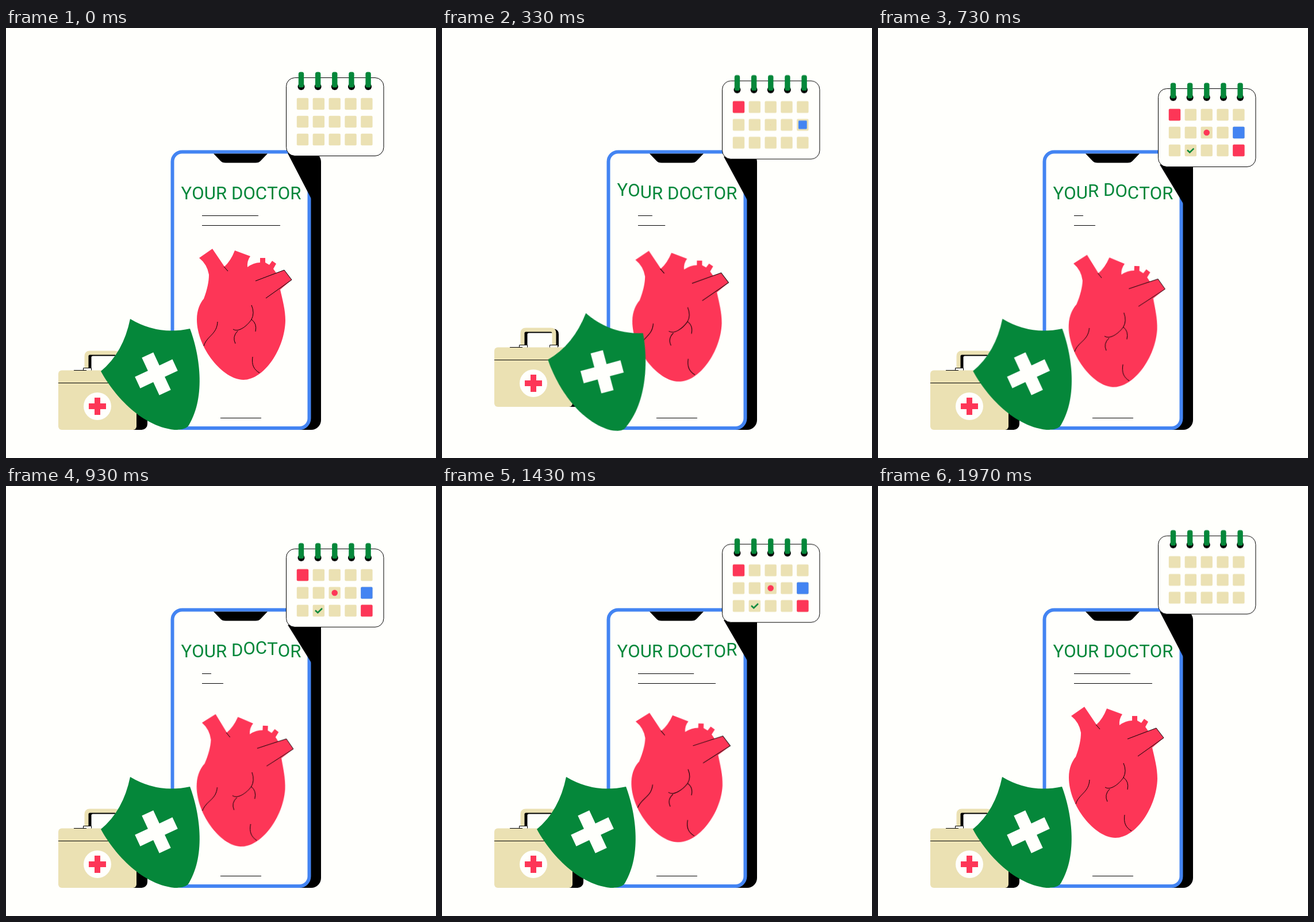
An HTML page for the animation above (2010 ms loop, 748x748 px).

```html
<!DOCTYPE html>
<html lang="en">
<head>
<meta charset="utf-8">
<title>Your doctor</title>
<style>
  :root {
    --paper: #fffffc; --green: #05873a; --red: #fd3657;
    --blue: #4384f2; --tan: #ebe1b3;
    --loop: 2010ms; --soft: cubic-bezier(.37, 0, .63, 1);
  }
  html, body { margin: 0; width: 100%; height: 100%; overflow: hidden; background: var(--paper); }
  svg { position: absolute; left: 0; top: 0; width: 748px; height: 748px; }

  .paper { fill: var(--paper); }
  .green { fill: var(--green); }
  .red { fill: var(--red); }
  .blue { fill: var(--blue); }
  .tan { fill: var(--tan); }
  .thin { fill: none; stroke: #000; stroke-width: 1; }
  .frame { stroke: var(--blue); stroke-width: 6; }
  .handle { fill: none; stroke: #000; stroke-width: 7; }
  .handle.light { stroke: var(--tan); }

  .title {
    position: absolute; left: 304.5px; top: 267.5px; white-space: pre;
    font: 400 31.2px/40px Roboto, Arial, sans-serif; color: var(--green);
  }
  .title span { display: inline-block; animation-delay: calc(var(--i) * 108ms); }

  .title span, .calendar, .cast, .heart, .beat, .case, .shield, .short, .long, .pop, .tick {
    animation-duration: var(--loop);
    animation-timing-function: var(--soft);
    animation-iteration-count: infinite;
  }
  .title span { animation-name: hop; }
  .calendar { animation-name: sink; }
  .cast { animation-name: cast; transform-origin: 490px 222px; }
  .heart { animation-name: sway; transform-origin: 410px 500px; }
  .beat { animation-name: beat; transform-origin: 410px 500px; }
  .case { animation-name: lift; }
  .shield { animation-name: tilt; transform-origin: 290px 697px; }
  .short { animation-name: short; transform-origin: 341px 0; }
  .long { animation-name: long; transform-origin: 341px 0; }
  .pop { transform-box: fill-box; transform-origin: center; }
  .tick {
    animation-name: tick; fill: none; stroke: var(--green); stroke-width: 2.5;
    stroke-dasharray: 1 2;
  }

  @keyframes hop { 0%, 29.85%, 100% { transform: none; } 14.93% { transform: translateY(-6px); } }
  @keyframes sink {
    0%, 100% { transform: translateY(0); }
    51% { transform: translateY(23.3px); animation-timing-function: cubic-bezier(.33, .05, .67, .93); }
  }
  @keyframes cast {
    0%, 100% { transform: translateY(0) scaleY(1); }
    51% {
      transform: translateY(23.3px) scaleY(.83);
      animation-timing-function: cubic-bezier(.33, .05, .67, .93);
    }
  }
  @keyframes sway {
    0%, 100% { transform: translateY(0) rotate(0deg); }
    51% { transform: translateY(15.5px) rotate(2.8deg); }
  }
  @keyframes beat {
    0%, 7.5%, 25.4%, 58.7%, 83.6%, 100% { transform: scale(1, 1); }
    16.4% { transform: scale(1.01, .995); }
    71.1% { transform: scale(1.03, .98); }
  }
  @keyframes lift { 0%, 35.3%, 100% { transform: translateY(0); } 17.7% { transform: translateY(-40.5px); } }
  @keyframes tilt { 0%, 37.8%, 100% { transform: rotate(0deg); } 18.9% { transform: rotate(10.4deg); } }
  @keyframes short { 0%, 72.6%, 100% { transform: scaleX(1); } 20.9%, 51.2% { transform: scaleX(.163); } }
  @keyframes long { 0%, 72.6%, 100% { transform: scaleX(1); } 20.9%, 51.2% { transform: scaleX(.272); } }
  @keyframes pop1 { 0%, 2%, 97.5%, 100% { transform: scale(0); } 14.4%, 89.6% { transform: scale(1); } }
  @keyframes pop2 { 0%, 8.5%, 97.5%, 100% { transform: scale(0); } 20.9%, 89.6% { transform: scale(1); } }
  @keyframes pop3 { 0%, 14.9%, 97.5%, 100% { transform: scale(0); } 27.4%, 89.6% { transform: scale(1); } }
  @keyframes pop4 { 0%, 20.6%, 97.5%, 100% { transform: scale(0); } 33.1%, 89.6% { transform: scale(1); } }
  @keyframes tick {
    0%, 27.9%, 97.5%, 100% { stroke-dashoffset: 1.01; }
    37.8%, 89.6% { stroke-dashoffset: 0; }
  }
</style>
</head>
<body>
<svg viewBox="0 0 748 748">
  <!-- phone -->
  <rect x="320" y="216" width="228" height="483" rx="17"/>
  <rect class="paper frame" x="289.500" y="215.500" width="238" height="480.500" rx="17"/>
  <path d="M361 218.500L373 231Q376 234.500 382 234.500H434Q440 234.500 443 231L455 218.500Z"/>
  <path class="thin short" d="M341 326.500H439"/>
  <path class="thin long" d="M341 343.500H477"/>
  <path class="thin" d="M373 678.500H444"/>

  <g class="heart"><g class="beat">
    <path class="red" d="M336 400L359 384L380 415Q391 405 398 387L425 397
      Q419 405 420 416Q431 408 442 408V400H451V408L458 412L463 405L470 410L465 419L470 426
      L484 421L497 438L477 455C481 473 486 490 486 509C485 558 449 612 413 612
      C378 612 332 557 332 507C332 490 338 478 344 471C350 455 353 441 353 429Q350 411 336 400Z"/>
    <path class="thin" d="M434 440L484 421L497 438L452 470M379 415L386 423
      M344 553C350 535 367 533 368 511M427 482Q433 496 427 507C419 519 404 530 395 524
      M403 527Q393 537 399 549M427 507Q437 514 434 528M429 572C427 586 431 594 441 600"/>
  </g></g>

  <!-- first aid case -->
  <g class="case">
    <rect x="118" y="600" width="128" height="99" rx="10"/>
    <path class="handle" d="M145 594V573Q145 567 151 567H193.500Q199.500 567 199.500 573V594"/>
    <path class="handle light" d="M140 594V571Q140 565 146 565H189Q195 565 195 571V594"/>
    <path class="paper" stroke="#000" d="M134.500 591.500h14v5h-14zM187.500 591.500h14v5h-14z"/>
    <rect class="tan" x="91" y="595.500" width="136" height="103.500" rx="6"/>
    <path class="thin" d="M91 617.500H227M118 595.500H140"/>
    <circle class="paper" cx="159" cy="658" r="24"/>
    <path class="red" d="M154 643h10v10h10v10h-10v10h-10v-10h-10v-10h10z"/>
  </g>

  <g class="shield">
    <path class="green" d="M216 506Q264 535 320 523C336 565 349 640 318 691
      Q313 699 293 699C232 692 185 634 165 597Q204 565 216 506Z"/>
    <path class="paper" transform="translate(261.500 601.500) rotate(-25)"
      d="M-11 -36h22v25h25v22h-25v25h-22v-25h-25v-22h25z"/>
  </g>

  <path class="cast" d="M490 218L531 297H533V218Z"/>
  <g class="calendar">
    <rect class="paper" stroke="#000" x="487.500" y="86.500" width="169.500" height="136" rx="15"/>
    <g id="pins"></g>
    <g id="days" class="tan"></g>
    <g id="marks">
      <circle class="red pop" cx="571.700" cy="163" r="5.300" style="animation-name:pop3"/>
      <path class="tick" pathLength="1" d="M538 193.500L542.300 197.500L550 190"/>
    </g>
  </g>
</svg>
<div class="title"></div>

<script>
  const byId = id => document.getElementById(id);

  function add(parent, tag, attrs) {
    const el = document.createElementNS("http://www.w3.org/2000/svg", tag);
    for (const key in attrs) el.setAttribute(key, attrs[key]);
    parent.append(el);
  }

  function day(parent, col, row, attrs) {
    add(parent, "rect", {
      x: 505.8 + col * 27.85, y: 121.8 + row * 31, width: 20.4, height: 20.4, rx: 2, ...attrs
    });
  }

  for (let i = 0; i < 5; i++) {
    const x = 513.5 + i * 29.15;
    add(byId("pins"), "circle", { cx: x, cy: 102, r: 6 });
    add(byId("pins"), "rect", { class: "green", x: x - 4.7, y: 76.5, width: 9.4, height: 27, rx: 3.5 });
    for (let row = 0; row < 3; row++) day(byId("days"), i, row);
  }

  day(byId("marks"), 0, 0, { class: "red pop", style: "animation-name:pop1" });
  day(byId("marks"), 4, 1, { class: "blue pop", style: "animation-name:pop2" });
  day(byId("marks"), 4, 2, { class: "red pop", style: "animation-name:pop4" });

  const title = document.querySelector(".title");
  let index = 0;
  for (const letter of "YOUR DOCTOR") {
    const span = document.createElement("span");
    span.textContent = letter;
    if (letter !== " ") span.style.setProperty("--i", index++);
    title.append(span);
  }
</script>
</body>
</html>
```
